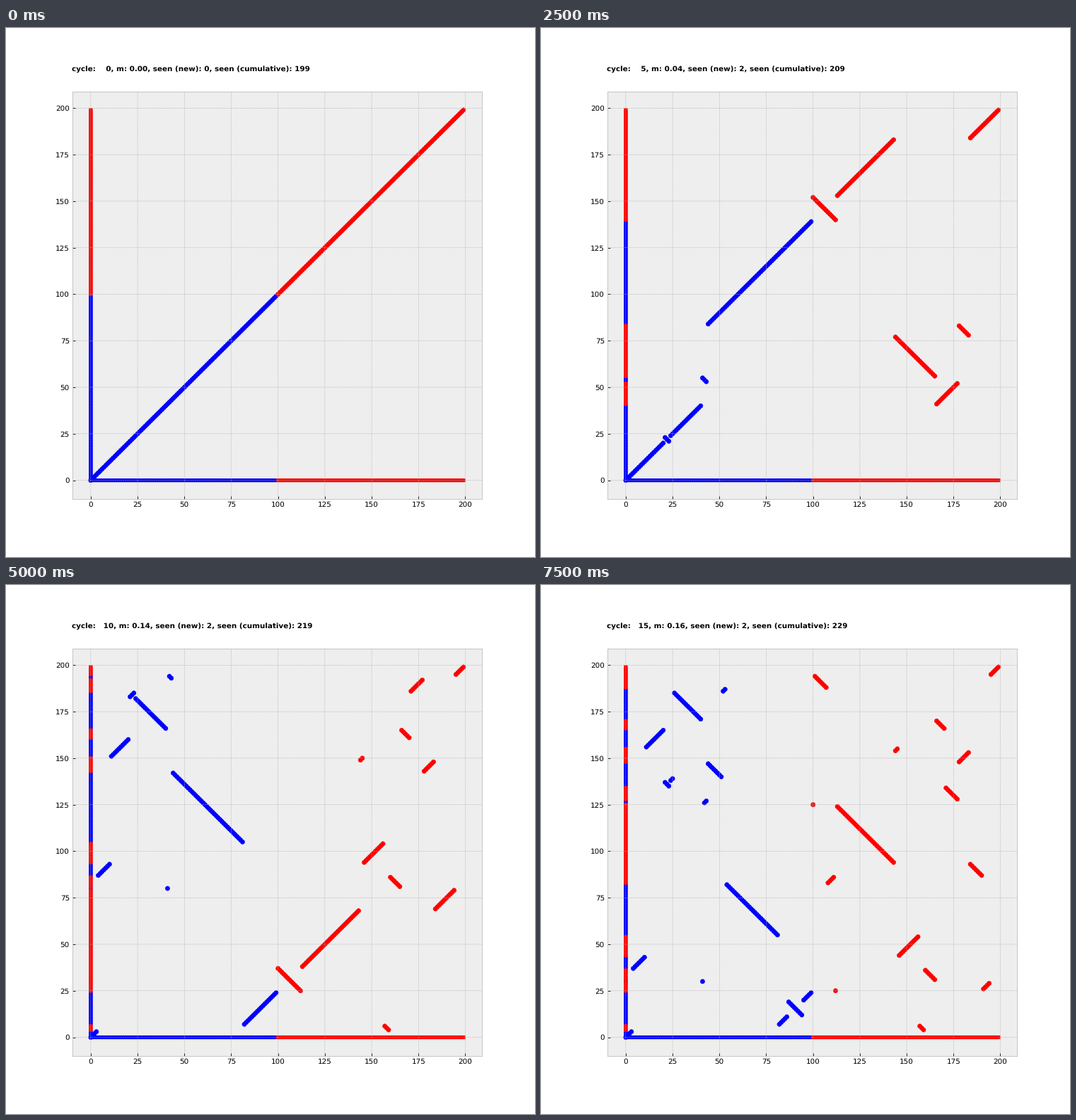
These frames come from a looping animation (748 by 748 pixels, 8000 ms). A matplotlib script:

```python
import numpy as np
import matplotlib.pyplot as plt
from matplotlib.animation import FuncAnimation

N, HALF = 200, 100

# Inverted stretch (first, last position) for each cycle
INVERSIONS = [
    (21, 23), (44, 177), (109, 121), (41, 55), (78, 183),
    (11, 75), (41, 65), (32, 194), (4, 24), (7, 104),
    (30, 132), (12, 19), (135, 180), (26, 86), (126, 194),
]

plt.rcParams.update({
    "font.family": "DejaVu Sans",
    "font.size": 10,
    "text.hinting": "none",
    "patch.linewidth": 0.5,
    "axes.facecolor": "#eeeeee",
    "axes.edgecolor": "#bcbcbc",
    "axes.grid": True,
    "grid.color": "#b2b2b2",
    "grid.linestyle": "--",
    "grid.linewidth": 0.5,
    "xtick.direction": "in",
    "ytick.direction": "in",
})


def gene_orders():
    """Gene order along the chromosome after every cycle."""
    order = np.arange(N)
    orders = [order]
    for lo, hi in INVERSIONS:
        order = order.copy()
        order[lo:hi + 1] = order[lo:hi + 1][::-1]
        orders.append(order)
    return orders


def adjacencies(order):
    return {tuple(sorted(p)) for p in zip(order[:-1].tolist(), order[1:].tolist())}


def mixing(order):
    """Extra borders between the two halves, per gene of one half."""
    side = order >= HALF
    return (np.count_nonzero(side[1:] != side[:-1]) - 1) / HALF


def build_captions(orders):
    seen = adjacencies(orders[0])
    captions = []
    for cycle, order in enumerate(orders):
        new = adjacencies(order) - seen
        seen |= new
        captions.append(f"cycle: {cycle:4d}, m: {mixing(order):.2f}, "
                        f"seen (new): {len(new)}, seen (cumulative): {len(seen)}")
    return captions


orders = gene_orders()
captions = build_captions(orders)
genes = np.arange(N)
zeros = np.zeros(N)
colors = ["blue"] * HALF + ["red"] * (N - HALF)

fig, ax = plt.subplots(figsize=(10, 10), dpi=74.8)
margin = 0.05 * (N - 1)
ax.set_xlim(-margin, N - 1 + margin)
ax.set_ylim(-margin, N - 1 + margin)
ticks = np.arange(0, N + 1, 25)
ax.set_xticks(ticks)
ax.set_yticks(ticks)
plt.setp(ax.get_xgridlines() + ax.get_ygridlines(), snap=False)

square = dict(c=colors, s=20, marker="s", snap=False)
dots = ax.scatter(genes, genes, c=colors, s=36)
ax.scatter(genes, zeros, **square)
bar = ax.scatter(zeros, genes, **square)
caption = ax.text(-10, 220, captions[0], weight="bold")


def update(cycle):
    pos = np.argsort(orders[cycle])
    dots.set_offsets(np.column_stack([genes, pos]))
    bar.set_offsets(np.column_stack([zeros, pos]))
    caption.set_text(captions[cycle])
    return dots, bar, caption


anim = FuncAnimation(fig, update, frames=len(orders), interval=500,
                     repeat=True, repeat_delay=0, blit=False)
plt.show()
```
